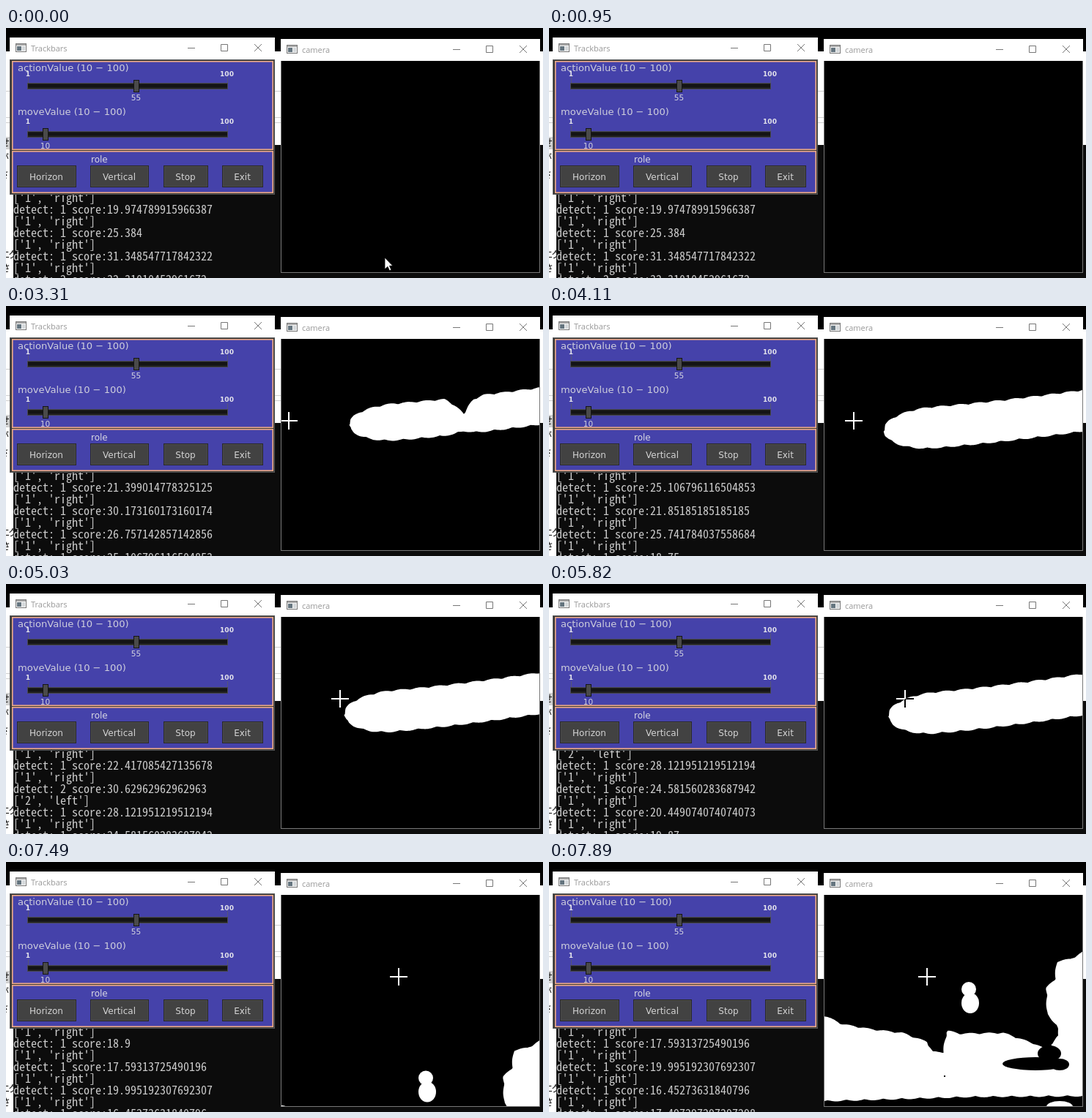
Write an HTML page with a canvas that moves like this. It is 733x342 px and loops after 8 s.

```html
<!DOCTYPE html>
<html lang="en">
<head>
<meta charset="utf-8">
<title>Trackbars</title>
<style>
  html, body { margin: 0; width: 100%; height: 100%; overflow: hidden; background: #000; }
  canvas { display: block; }
</style>
</head>
<body>
<canvas id="stage" width="733" height="342"></canvas>
<script>
const ctx = document.getElementById('stage').getContext('2d');
const LOOP = 8000;
const TICK = 240;          // one detection by the camera
const FIRST_TICK = 1815;
const ARM_ENTERS = 1980;
const ARM_LEAVES = 7490;
const HERSHEY = '"DejaVu Sans", sans-serif';
const TITLE = '11px "Open Sans", sans-serif';
const JAPANESE = '13px "Noto Sans CJK JP", "Noto Sans CJK", sans-serif';
const MONO = '"Noto Sans Mono CJK JP", "Noto Sans Mono", "Liberation Mono", monospace';

// The console uses cells 8 px wide.
ctx.font = `300 16px ${MONO}`;
const consoleFont = `300 ${(16 * 8 / ctx.measureText('0').width).toFixed(2)}px ${MONO}`;

// Console text; a leading "2:" marks a detection to the left.
const scores = `19.974789915966387 25.384 31.348547717842322 2:32.31010452961672 20.214953271028037
  24.12802742215588 21.399014778325125 30.173160173160174 26.757142857142856 25.106796116504853
  21.85185185185185 25.741784037558684 18.75 22.417085427135678 2:30.62962962962963
  28.121951219512194 24.581560283687942 20.449074074074073 19.87 19.835748792270532
  18.594285714285714 18.9 17.59313725490196 19.995192307692307 16.45273631840796
  17.497297297297298`.split(/\s+/);

const armKeys = [
  { t: 1980, tip: 700, tipY: 92, endY: 88, radius: 16, notch: 0 },
  { t: 2295, tip: 595, tipY: 115, endY: 92, radius: 21, notch: 0 },
  { t: 3310, tip: 469, tipY: 162, endY: 137, radius: 25, notch: 24 },
  { t: 4110, tip: 458, tipY: 170, endY: 143, radius: 28, notch: 0 },
  { t: 5820, tip: 464, tipY: 180, endY: 151, radius: 28, notch: 0 },
  { t: 6620, tip: 462, tipY: 182, endY: 152, radius: 28, notch: 0 }
];

const mix = (a, b, p) => a + (b - a) * p;
const clamp01 = p => Math.max(0, Math.min(1, p));
const easeOut = p => 1 - (1 - clamp01(p)) ** 2;

function box(x, y, w, h, fill, stroke) {
  ctx.fillStyle = fill;
  ctx.fillRect(x, y, w, h);
  if (stroke) {
    ctx.strokeStyle = stroke;
    ctx.lineWidth = 1;
    ctx.strokeRect(x + .5, y + .5, w - 1, h - 1);
  }
}

function text(str, x, y, font, color, align = 'left') {
  ctx.font = font;
  ctx.fillStyle = color;
  ctx.textAlign = align;
  ctx.fillText(str, x, y);
}

// Fills a clockwise polygon whose edges swell into small round bumps.
function scalloped(points, fill = '#fff', bump = 2) {
  let walked = 0;
  ctx.beginPath();
  points.forEach(([x, y], i) => {
    const [nextX, nextY] = points[(i + 1) % points.length];
    const dx = nextX - x, dy = nextY - y, length = Math.hypot(dx, dy) || 1;
    for (let d = 0; d < length; d += 2) {
      const out = bump * Math.abs(Math.sin((walked + d) / 8));
      ctx.lineTo(x + (dx * d + dy * out) / length, y + (dy * d - dx * out) / length);
    }
    walked += length;
  });
  ctx.fillStyle = fill;
  ctx.fill();
}

function ellipse(x, y, rx, ry, fill) {
  ctx.beginPath();
  ctx.ellipse(x, y, rx, ry, 0, 0, 2 * Math.PI);
  ctx.fillStyle = fill;
  ctx.fill();
}

function drawDesktop() {
  box(0, 0, 733, 342, '#000');
  box(0, 32, 733, 128, '#fff');
  for (const y of [86, 122, 129]) box(0, y, 375, 1, '#d0d0d0');
  box(10, 160, 723, 182, '#0c0c0c');
  box(0, 130, 10, 212, '#fff');
  box(0, 149, 6, 17, '#d0d0d0');
  [['せ', -8, 161], ['が', -9, 182], ['さ', -9, 205], ['エ', -8, 314], ['ク', 3, 314], ['さ', -7, 333]]
    .forEach(([s, x, y]) => text(s, x, y, JAPANESE, '#111'));
}

function drawConsole(tick) {
  // Later on the console misses every fourth detection.
  const first = tick - Math.max(0, Math.ceil((tick - 15) / 4));
  ctx.save();
  ctx.beginPath();
  ctx.rect(10, 228, 364, 114);
  ctx.clip();
  for (let row = -1; row < 4; row++) {
    const y = 254 + row * 32;
    const [score, side = '1'] = (scores[first + row] || '').split(':').reverse();
    if (row >= 0) text(`detect: ${side} score:${score}`, 10, y, consoleFont, '#ccc');
    text(`['${side}', '${side === '2' ? 'left' : 'right'}']`, 10, y + 16, consoleFont, '#ccc');
  }
  ctx.restore();
}

function drawTitleBar(x, y, w, title) {
  box(x, y, w, 30, '#fff');
  box(x + 8, y + 8, 15, 12, '#f4f4f4', '#777');
  box(x + 9, y + 9, 13, 2, '#aaa');
  box(x + 10, y + 12, 6, 6, '#65757f');
  box(x + 17, y + 12, 4, 6, '#d4d8da');
  text(title, x + 29, y + 19, TITLE, '#999');
  const right = x + w;
  ctx.strokeStyle = '#777';
  ctx.lineWidth = 1;
  ctx.beginPath();
  ctx.moveTo(right - 119, y + 14.5);
  ctx.lineTo(right - 109, y + 14.5);
  ctx.rect(right - 73.5, y + 9.5, 9, 9);
  ctx.moveTo(right - 28, y + 9);
  ctx.lineTo(right - 18, y + 19);
  ctx.moveTo(right - 18, y + 9);
  ctx.lineTo(right - 28, y + 19);
  ctx.stroke();
}

function drawSlider(label, value, handleX, labelY, scaleY, trackY) {
  text(label, 16, labelY, `13.1px ${HERSHEY}`, '#cecedc');
  for (const [mark, x] of [['1', 30], ['100', 301.5]]) {
    text(mark, x, scaleY, `bold 9px ${HERSHEY}`, '#e4e4ec', 'center');
  }
  for (const x of [30, 302]) box(x, trackY - 8, 1, 8, '#555578');
  box(29, trackY, 274, 9, '#202020', '#484850');
  box(30, trackY + 2, 272, 4, '#141414');
  box(handleX - 4, trackY - 4, 8, 17, '#4a4a4a', '#151515');
  text(value, handleX - .5, trackY + 24, `10.5px ${HERSHEY}`, '#d4d4e0', 'center');
}

function drawTrackbars() {
  drawTitleBar(5, 13, 362, 'Trackbars');
  box(5, 43, 362, 185, '#3a3a3a', '#555');
  for (const [y, h] of [[45, 122], [168, 58]]) {
    box(8, y, 357, h, '#4542aa');
    ctx.strokeStyle = '#eeaa86';
    ctx.lineWidth = 1.6;
    ctx.strokeRect(8.8, y + .8, 355.4, h - 1.6);
  }
  drawSlider('actionValue (10 − 100)', '55', 178, 59, 66, 75);
  drawSlider('moveValue (10 − 100)', '10', 54, 119, 131, 141);
  text('role', 116, 184, `12px ${HERSHEY}`, '#d8d8e2');
  for (const [name, x, w] of [['Horizon', 15, 81], ['Vertical', 115, 80], ['Stop', 215, 61], ['Exit', 295, 56]]) {
    box(x, 188, w, 30, '#292929');
    box(x + 1, 189, w - 2, 28, '#424242', '#4a4a4a');
    text(name, x + w / 2 - .5, 208, `12px ${HERSHEY}`, '#d4d4d4', 'center');
  }
}

function armAt(t) {
  const k = Math.max(0, armKeys.findLastIndex(key => key.t <= t));
  const from = armKeys[k], to = armKeys[k + 1] || from;
  const p = easeOut((t - from.t) / (to.t - from.t || 1));
  return Object.fromEntries(Object.keys(from).map(name => [name, mix(from[name], to[name], p)]));
}

// A tube with a round tip that rises gently towards the right side.
function drawArm(t) {
  const { tip, tipY, endY, radius, notch } = armAt(t);
  const top = [], bottom = [];
  for (let i = 0; i <= 24; i++) {
    const u = (i / 24) ** 1.5;
    const x = mix(tip, 730, u);
    const middle = mix(tipY, endY, u ** 1.4);
    const half = (radius - 1) * Math.sqrt(1 - (1 - Math.min(1, u / .25)) ** 2);
    const wrist = notch * Math.exp(-(((x - 623) / 12) ** 2));
    top.push([x, middle - half + wrist]);
    bottom.unshift([x, middle + half - wrist / 6]);
  }
  scalloped([...top, ...bottom]);
}

function drawRoom(t) {
  ctx.save();
  ctx.translate(0, (7890 - t) * .3);
  // floor
  scalloped([[375, 211], [400, 223], [440, 230], [482, 235], [515, 247], [523, 261], [539, 261], [544, 232],
    [560, 236], [620, 235], [663, 250], [690, 264], [730, 264], [730, 319], [580, 320], [375, 326]]);
  // wall
  scalloped([[730, 124], [730, 270], [703, 270], [686, 250], [697, 238], [694, 222],
    [681, 208], [680, 173], [692, 160], [694, 137], [712, 134]]);
  ellipse(664, 276, 45, 9, '#000');
  ellipse(683, 262, 16, 11, '#000');
  ellipse(697, 277, 13, 8, '#000');
  ellipse(573, 174, 10, 10, '#fff');
  ellipse(575, 193, 12, 14, '#fff');
  ellipse(697, 335, 18, 8, '#fff');
  box(539, 292, 2, 2, '#000');
  ctx.restore();
}

function drawCross(tick) {
  const x = 385 + 10 * Math.max(0, Math.min(tick - 6, 38 - tick));
  ctx.globalCompositeOperation = 'difference';
  box(x, 145, 2, 24, '#fff');
  box(x - 11, 156, 11, 2, '#fff');
  box(x + 2, 156, 11, 2, '#fff');
  ctx.globalCompositeOperation = 'source-over';
}

function drawCamera(t, tick) {
  box(375, 15, 354, 320, '#000', '#777');
  drawTitleBar(375, 15, 354, 'camera');
  if (t < ARM_ENTERS) return;
  ctx.save();
  ctx.beginPath();
  ctx.rect(376, 46, 352, 288);
  ctx.clip();
  // Each detection brings two camera images.
  const phase = (t - FIRST_TICK) % TICK;
  const shown = t - phase + (phase < 75 ? 0 : 75);
  if (t < ARM_LEAVES) drawArm(shown); else drawRoom(Math.min(7890, shown + 75));
  drawCross(tick);
  ctx.restore();
}

function drawCursor(t) {
  if (t >= 950) return;
  const hop = start => clamp01(Math.floor((t - start) / 72) / 5);
  ctx.save();
  ctx.translate(517 - 188 * hop(0) + 38 * hop(590), 314 - 203 * hop(0) + 40 * hop(590));
  const arrow = new Path2D('M0 0V16L4 12.5 6.5 18 9 17 6.5 11.5H11Z');
  ctx.fillStyle = '#fff';
  ctx.fill(arrow);
  ctx.strokeStyle = '#000';
  ctx.lineWidth = .8;
  ctx.stroke(arrow);
  ctx.restore();
}

function frame() {
  const t = performance.now() % LOOP;
  const tick = Math.max(0, Math.floor((t - FIRST_TICK) / TICK));
  drawDesktop();
  drawConsole(tick);
  drawTrackbars();
  drawCamera(t, tick);
  drawCursor(t);
  requestAnimationFrame(frame);
}
frame();
</script>
</body>
</html>
```
